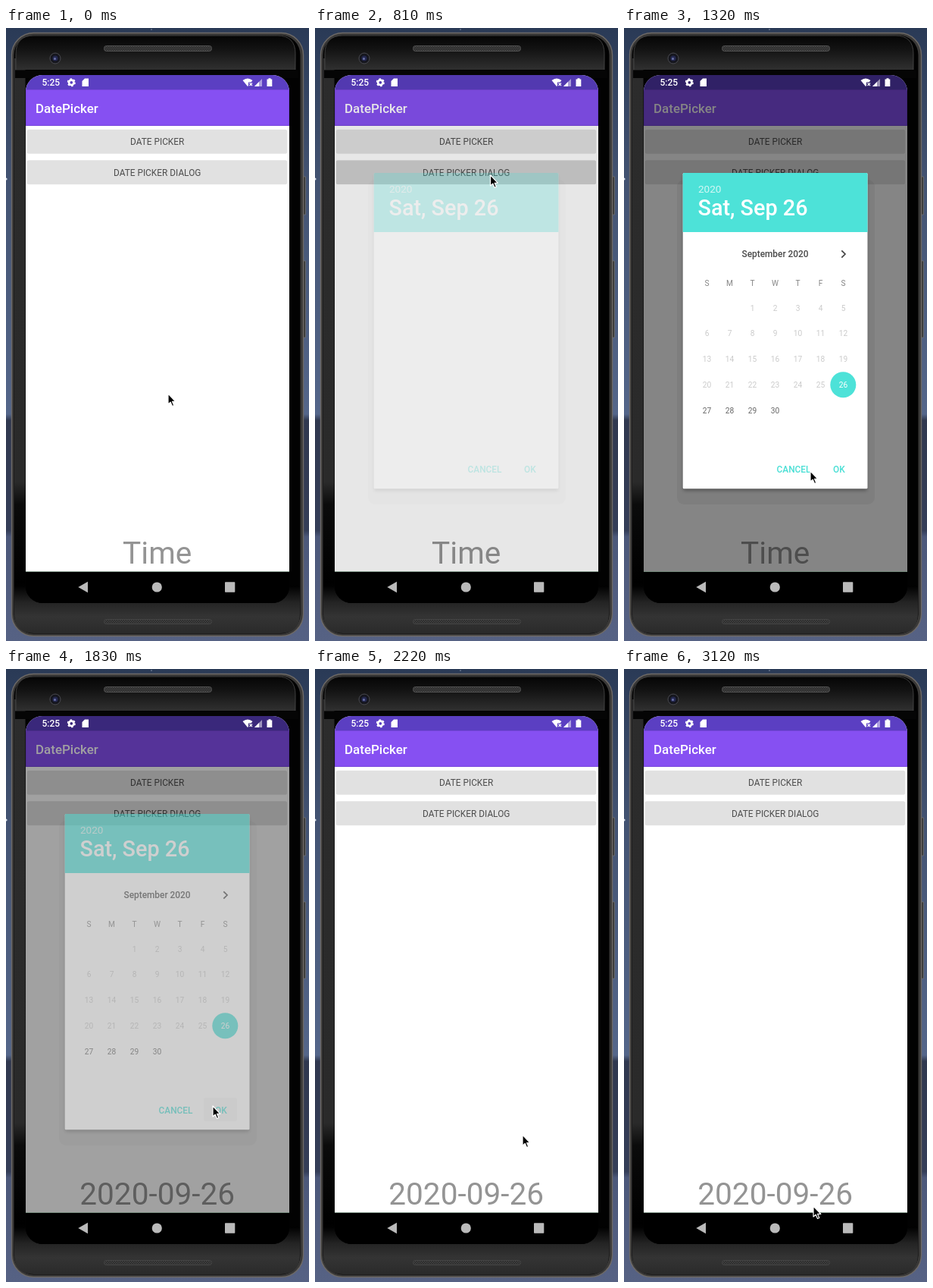
Animation of 400x808 px, one loop 3.15 s. Source, as an HTML page:

```html
<!DOCTYPE html>
<html lang="en">
<head>
<meta charset="utf-8">
<title>Date dialog</title>
<style>
html, body { margin: 0; width: 100%; height: 100%; overflow: hidden; background: #3c4a66; }
svg { display: block; width: 100vw; height: 100vh; font-family: Roboto, sans-serif; }
.mid { text-anchor: middle; }
.medium { font-weight: 500; }
.label { font-size: 11.86px; }
.small { font-size: 10.2px; }
.big { font-size: 40.6px; fill: #949494; }
</style>
</head>
<body>
<svg viewBox="0 0 400 808" preserveAspectRatio="none">
  <defs>
    <linearGradient id="sky" x2="0" y2="1">
      <stop offset="0" stop-color="#2a3a56"/>
      <stop offset=".25" stop-color="#435372"/>
      <stop offset=".63" stop-color="#54668a"/>
      <stop offset=".64" stop-color="#30384f"/>
      <stop offset=".82" stop-color="#353e58"/>
      <stop offset=".83" stop-color="#4c587a"/>
      <stop offset="1" stop-color="#566284"/>
    </linearGradient>
    <linearGradient id="side" x2="0" y2="1">
      <stop offset="0" stop-color="#2c2c2c"/>
      <stop offset=".76" stop-color="#2a2a2a"/>
      <stop offset=".8" stop-color="#0b0b0b"/>
      <stop offset=".94" stop-color="#000"/>
      <stop offset="1" stop-color="#101010"/>
    </linearGradient>
    <linearGradient id="brow" x2="0" y2="1">
      <stop offset="0" stop-color="#050505"/>
      <stop offset=".4" stop-color="#131313"/>
      <stop offset="1" stop-color="#303030"/>
    </linearGradient>
    <linearGradient id="chin" x2="0" y2="1">
      <stop offset="0" stop-color="#000"/>
      <stop offset=".35" stop-color="#242424"/>
      <stop offset=".65" stop-color="#343434"/>
      <stop offset="1" stop-color="#2a2a2a"/>
    </linearGradient>
    <pattern id="mesh" width="3" height="3" patternUnits="userSpaceOnUse">
      <path d="M0 0h3v3H0z" fill="#272727"/>
      <path d="M0 0h1.5v1.5H0zM1.5 1.5H3V3H1.5z" fill="#454545"/>
    </pattern>
    <clipPath id="glass"><rect x="26" y="62" width="348" height="696" rx="22"/></clipPath>
    <filter id="blur" x="-10%" y="-10%" width="120%" height="120%"><feGaussianBlur stdDeviation="2"/></filter>
  </defs>

  <rect width="400" height="808" fill="url(#sky)"/>
  <circle cx="0" cy="199" r="1.6" fill="#dfe5ee"/>
  <circle cx="192" cy="2" r=".8" fill="#8e9ab0"/>

  <g id="phone">
    <path d="M391 196h4.5v50H391zM391 307h4.5v101H391z" fill="#393939" stroke="#777" stroke-width=".7"/>
    <rect x="7.500" y="6.500" width="385" height="795" rx="29" fill="#3a3938" stroke="#6e6a67" stroke-width="1.400"/>
    <rect x="10.500" y="9.500" width="378" height="789" rx="26" fill="#020202"/>
    <rect x="11" y="40" width="14.500" height="735" fill="url(#side)"/>
    <path d="M13 55V34Q13 10 37 10H358Q382 10 382 34V55Z" fill="url(#brow)"/>
    <path d="M13 55V34Q13 10 37 10H358Q382 10 382 34V55" fill="none" stroke="#4c4c4c" stroke-width=".8"/>
    <path d="M12 55.500H386V66H12Z" fill="#050505"/>
    <path d="M11 735H388V772Q388 798 362 798H37Q11 798 11 772Z" fill="url(#chin)"/>
    <rect x="26" y="700" width="348" height="58" rx="22" fill="#000"/>
    <rect x="129.500" y="23.500" width="142" height="7" rx="3" fill="url(#mesh)" stroke="#555" stroke-width=".9"/>
    <rect x="129.500" y="779.500" width="142" height="6" rx="3" fill="url(#mesh)" stroke="#474747" stroke-width=".9"/>
    <circle cx="65" cy="40" r="7" fill="#15161d" stroke="#4a4a50"/>
    <circle cx="65" cy="40" r="3.600" fill="#242850"/>
    <circle cx="64.500" cy="40.500" r="1.500" fill="#6d76a8"/>
  </g>

  <g clip-path="url(#glass)">
    <rect x="26" y="62" width="348" height="655" fill="#fff"/>
    <rect x="26" y="62" width="348" height="20" fill="#5b3fc2"/>
    <rect x="26" y="81" width="348" height="48" fill="#8650f2"/>
    <rect x="26.500" y="81.500" width="347" height="47" fill="none" stroke="#7746dc"/>
    <text class="medium" x="39" y="112" font-size="16.94" fill="#fff">DatePicker</text>
    <g fill="#e1e1e1" stroke="#d9d9d9" stroke-width=".6">
      <rect x="28.300" y="134.300" width="342.400" height="31" rx="1.500"/>
      <rect x="28.300" y="174.700" width="342.400" height="31" rx="1.500"/>
    </g>
    <rect id="press" x="28" y="174.500" width="343" height="31.500" rx="1.500" opacity="0"/>
    <g class="mid label" fill="#4e4e4e">
      <text x="199.700" y="154">DATE PICKER</text>
      <text x="199.700" y="194.500">DATE PICKER DIALOG</text>
    </g>
    <text id="result" class="mid big" x="199.700" y="706">Time</text>
    <rect id="dim" x="26" y="62" width="348" height="655" opacity="0"/>

    <g fill="#fff">
      <text class="medium" x="47.500" y="76" font-size="12">5:25</text>
      <circle cx="86.300" cy="71.800" r="3.200" fill="none" stroke="#fff" stroke-width="2.600"/>
      <circle cx="86.300" cy="71.800" r="4.700" fill="none" stroke="#fff" stroke-width="1.700" stroke-dasharray="2.460 2.460"/>
      <path d="M104 66.500H109V77H100.500V70Z"/>
      <path d="M312.500 69Q319 64 325.500 69L323.500 71.500H320V76L319 77Z"/>
      <path d="M321.500 72.500l3.500 3.500m0-3.500l-3.500 3.500" stroke="#fff" stroke-width="1.100"/>
      <path d="M328 77L338 67V77Z" opacity=".5"/>
      <path d="M328 77L334 71V77Z"/>
      <path d="M344.500 67.500H346.500V66.300H349.500V67.500H351.300V77H344.500Z"/>
    </g>

    <rect x="26" y="717" width="348" height="41" fill="#000"/>
    <path d="M26 716.500H374" stroke="#6f8a78" stroke-width=".8"/>
    <g fill="#bababa">
      <path d="M95.300 737L108 729.700V744.300Z"/>
      <circle cx="199.300" cy="737" r="6.600"/>
      <rect x="289" y="730.300" width="13.300" height="13.400" rx=".8"/>
    </g>
  </g>

  <g id="dialog" opacity="0">
    <rect x="70" y="200" width="261" height="428" rx="9" opacity=".05"/>
    <rect x="78" y="194" width="243" height="416" rx="2" opacity=".3" filter="url(#blur)"/>
    <rect x="77.700" y="191" width="243.800" height="416.300" rx="1.500" fill="#fff"/>
    <path d="M77.700 269V192.500Q77.700 191 79.200 191H320Q321.500 191 321.500 192.500V269Z" fill="#4de2d8"/>
    <text x="98" y="217" font-size="13.550" fill="#d3f7f4">2020</text>
    <text class="medium" x="97.500" y="247" font-size="28.800" fill="#fff">Sat, Sep 26</text>
    <g id="month">
      <text class="mid label medium" x="199.500" y="302" fill="#4a4a4a">September 2020</text>
      <path d="M287.300 293.300L292 298L287.300 302.700" fill="none" stroke="#444" stroke-width="1.700"/>
      <g id="days" class="mid small"></g>
    </g>
    <rect id="okPress" x="261" y="565" width="44" height="31" rx="2" opacity="0"/>
    <g class="label medium" fill="#4adfd5">
      <text x="201.500" y="585.700">CANCEL</text>
      <text x="276" y="585.700">OK</text>
    </g>
  </g>

  <path id="cursor" d="M0 0V14L3.200 11.200L5.500 16.500L7.800 15.500L5.600 10.400H9.800Z" fill="#000" stroke="#fff" stroke-width="1.200" stroke-linejoin="round"/>
</svg>
<script>
const LOOP = 3150, CONFIRM = 1770;
const $ = id => document.getElementById(id);
const ui = {};
for (const id of ['press', 'result', 'dim', 'dialog', 'month', 'days', 'okPress', 'cursor']) ui[id] = $(id);

function add(tag, attrs, text = '') {
  const el = document.createElementNS('http://www.w3.org/2000/svg', tag);
  for (const k in attrs) el.setAttribute(k, attrs[k]);
  el.textContent = text;
  ui.days.append(el);
}

const colX = i => 109.5 + 30 * i;
[...'SMTWTFS'].forEach((d, i) => add('text', { x: colX(i), y: 340.3, fill: '#858585' }, d));
add('circle', { cx: 289.3, cy: 470.3, r: 17, fill: '#4de2d8' });
for (let d = 1; d <= 30; d++) {
  const cell = d + 1;
  const fill = d < 26 ? '#cbcbcb' : d === 26 ? '#fff' : '#666';
  add('text', { x: colX(cell % 7), y: 372.6 + 33.75 * Math.floor(cell / 7), fill }, d);
}

// Each track: [time, value...]
const pointer = [
  [0, 214, 482], [30, 214, 482], [480, 230, 191], [760, 230, 191],
  [900, 236.5, 210], [1260, 246, 584], [1380, 246, 584], [1590, 273, 576],
  [1900, 273, 576], [2220, 274, 614], [2700, 250, 708], [LOOP, 250, 708]
];
const tracks = {
  press: [[600, 0], [700, .07], [1000, .07], [1200, 0]],
  dim: [[780, 0], [940, .48], [1780, .48], [2000, 0]],
  dialog: [[790, 0], [870, 1], [1770, 1], [1890, 0]],
  month: [[820, 0], [1010, 1]],
  okPress: [[1690, 0], [1760, .06], [1890, 0]]
};

function segment(keys, t) {
  let i = 0;
  while (i < keys.length - 2 && t >= keys[i + 1][0]) i++;
  const [a] = keys[i], [b] = keys[i + 1];
  return [i, Math.min(1, Math.max(0, (t - a) / (b - a)))];
}

function linear(keys, t) {
  const [i, u] = segment(keys, t);
  return keys[i][1] + (keys[i + 1][1] - keys[i][1]) * u;
}

// Monotone cubic through the keys, at rest on every plateau
function smooth(keys, t, axis) {
  const [i, u] = segment(keys, t);
  const slope = j => keys[j] && keys[j + 1]
    ? (keys[j + 1][axis] - keys[j][axis]) / (keys[j + 1][0] - keys[j][0]) : 0;
  const tangent = j => {
    const a = slope(j - 1), b = slope(j);
    return a * b > 0 ? 2 * a * b / (a + b) : 0;
  };
  const h = keys[i + 1][0] - keys[i][0], v = 1 - u;
  return v * v * (1 + 2 * u) * keys[i][axis] + u * u * (3 - 2 * u) * keys[i + 1][axis]
    + h * u * v * (v * tangent(i) - u * tangent(i + 1));
}

function draw(t) {
  for (const id in tracks) ui[id].setAttribute('opacity', linear(tracks[id], t));
  ui.result.textContent = t < CONFIRM ? 'Time' : '2020-09-26';
  ui.cursor.setAttribute('transform', `translate(${smooth(pointer, t, 1)} ${smooth(pointer, t, 2)})`);
}

const start = performance.now();
function tick() {
  draw((performance.now() - start) % LOOP);
  requestAnimationFrame(tick);
}
tick();
</script>
</body>
</html>
```
